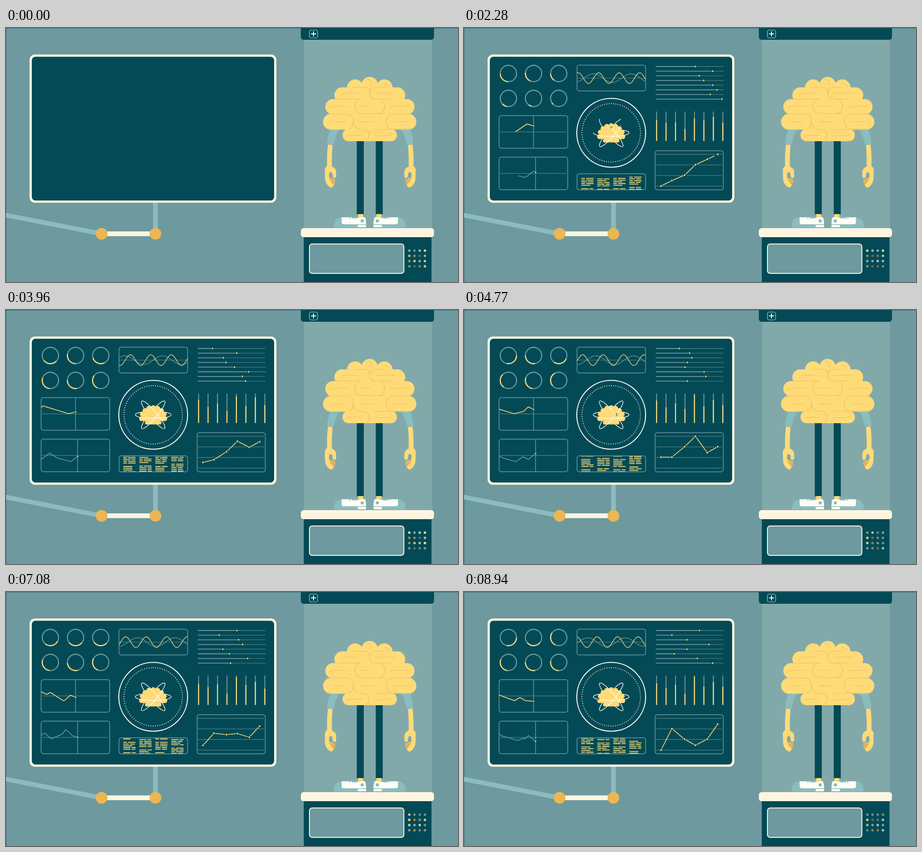
These frames come from a looping animation (998x561 px, 8970 ms). An HTML page with a canvas:

```html
<!DOCTYPE html>
<html lang="en">
<head>
<meta charset="utf-8">
<title>Brain scan</title>
<style>
html, body { margin: 0; width: 100%; height: 100%; overflow: hidden; background: #6d999f; }
canvas { display: block; }
</style>
</head>
<body>
<canvas id="stage" width="998" height="561"></canvas>
<script>
const W = 998, H = 561, LOOP = 8970;
const BG = '#6d999f', DARK = '#034a56', CREAM = '#fdf5e0', BLUE = '#8bbcbe',
  YELLOW = '#ffdb78', GOLD = '#ebb653', GREY = '#6d999f', WHITE = '#fffdf5';

const stage = document.getElementById('stage').getContext('2d');
const backdrop = document.createElement('canvas');
backdrop.width = W;
backdrop.height = H;
let c = backdrop.getContext('2d');

const clamp = v => Math.max(0, Math.min(1, v));
const lerp = (a, b, p) => a + (b - a) * p;
const inOut = p => p < .5 ? 4 * p ** 3 : 1 - 4 * (1 - p) ** 3;
const out = p => 1 - (1 - p) ** 3;
const ramp = (t, start, len) => clamp((t - start) / len);
const hash = n => { const s = Math.sin(n * 127.1 + 3.7) * 43758.5453; return s - Math.floor(s); };

// Eased value at time t between keyed values
function keyed(times, values, t) {
  if (t <= times[0]) return values[0];
  for (let i = 1; i < times.length; i++) {
    if (t < times[i]) {
      const p = (t - times[i - 1]) / (times[i] - times[i - 1]);
      return lerp(values[i - 1], values[i], p * p * (3 - 2 * p));
    }
  }
  return values[times.length - 1];
}

function rect(x, y, x2, y2, r, fill, stroke, width) {
  c.beginPath();
  c.roundRect(x, y, x2 - x, y2 - y, r);
  if (fill) { c.fillStyle = fill; c.fill(); }
  if (stroke) { c.strokeStyle = stroke; c.lineWidth = width; c.stroke(); }
}

function disc(x, y, r, fill) {
  c.beginPath();
  c.arc(x, y, r, 0, Math.PI * 2);
  c.fillStyle = fill;
  c.fill();
}

function line(points, color, width) {
  c.beginPath();
  points.forEach(([x, y]) => c.lineTo(x, y));
  c.strokeStyle = color;
  c.lineWidth = width;
  c.stroke();
}

function dotted(x, y, x2, gap = 3.4, width = 1.4) {
  if (x2 <= x) return;
  c.save();
  c.lineCap = 'round';
  c.setLineDash([0, gap]);
  line([[x, y], [x2, y]], '#e6eee4', width);
  c.restore();
}

function arc(x, y, r, from, to, color, width) {
  c.beginPath();
  c.arc(x, y, r, from, to);
  c.strokeStyle = color;
  c.lineWidth = width;
  c.stroke();
}

function shape(d, fill, stroke, width) {
  const p = new Path2D(d);
  if (fill) { c.fillStyle = fill; c.fill(p); }
  if (stroke) { c.strokeStyle = stroke; c.lineWidth = width; c.stroke(p); }
}

function mirrored(axis, draw) {
  draw();
  c.save();
  c.translate(axis * 2, 0);
  c.scale(-1, 1);
  draw();
  c.restore();
}

function brain() {
  disc(803, 126, 18, YELLOW);
  mirrored(803.2, () => {
    disc(771, 131.5, 18, YELLOW);
    disc(742.5, 148.5, 17.5, YELLOW);
  });
  rect(742, 131, 864, 166, 8, YELLOW);
  rect(705, 157, 902, 191, 17, YELLOW);
  rect(700, 190, 906, 224.5, 17, YELLOW);
  rect(743, 223, 863, 250, 13, YELLOW);
}

function grooves() {
  c.lineCap = 'round';
  shape(`M741 151 Q742 144 750 144 H776 M766 131 H792 Q802 131 803 142 Q803 157 816 157 H848
    M797 114 Q806 113 806 121 V126 M803 145 Q804 131 816 131 H837 M834 122 Q844 123 846 131
    M816 144 H859 M724 157 H784 M715 177 Q717 173 724 173 H754 M783 157 Q770 160 770 173
    Q771 187 786 189 H836 M784 173 H806 M823 157 Q836 161 836 174 Q834 188 822 189
    M849 177 Q850 173 857 173 H889 M708 190 H754 Q767 192 767 207 Q767 220 757 223
    M719 207 H750 M783 207 H812 M792 205 V208 M767 205 Q768 223 783 224 H793 Q802 227 802 238 Q801 246 796 247
    M839 207 Q841 192 853 190 H898 M839 207 Q841 220 850 223 H895 M856 207 H888
    M815 224 H850 M752 240 Q753 237 760 237 H786 M812 238 H842 Q850 237 853 233`, null, '#eabd60', 1.2);
  c.lineCap = 'butt';
}

function limb() {
  shape('M716 224 H736 Q727 238 723.5 258 L709 256 Q710 240 716 224Z', BLUE);
  shape('M711 257 L721 258.5 Q719 281 719.5 306 Q728 309 729 318 V328 Q728 332 724 331 Q721 330 721 324 Q721 318 716 318 Q713 319 713 327 Q714 334 720 332 L727 336 Q726 345 721 351 Q718 354 713 350 Q706 344 704.5 334 L704 313 Q705 307 709 305 Q708 280 711 257Z', YELLOW);
  shape('M713 332 Q719 335 727 333 Q728 340 724 347 Q718 342 713 332Z', '#dfb35c');
}

function leg() {
  rect(774.5, 249, 790, 411.5, 0, DARK);
  rect(777.5, 411, 788.5, 420, 0, YELLOW);
  shape('M724 441 V434 Q726 419 742 418 H795 V441Z', BLUE);
  shape('M741 418 H761 Q770 422 776 419 L791 417.5 Q795 421 795 433.5 H745 Q741 433 741 429Z', WHITE);
  rect(776.5, 435, 795, 440, 1, WHITE);
  disc(786.5, 426, 3.6, BLUE);
  c.lineCap = 'round';
  shape('M757 416 l3 5 M762.5 415.5 l3 5.5 M768 415.5 l3 5.5 M773 415 l2 5', null, BLUE, 1.5);
  c.lineCap = 'butt';
}

function drawBackdrop() {
  rect(0, 0, W, H, 0, BG);
  rect(0, 0, W, 1, 0, 'rgba(3,74,86,.5)');
  rect(0, 0, 1, H, 0, 'rgba(3,74,86,.5)');

  line([[-4, 412.5], [211, 454.5]], BLUE, 10);
  line([[330, 384], [330, 455]], BLUE, 10.5);
  line([[211, 454.5], [330, 454.5]], CREAM, 10.5);
  disc(211, 454.5, 13, GOLD);
  disc(330, 454.5, 13, GOLD);
  rect(52, 58.5, 597, 386, 12, CREAM);
  rect(57, 63.5, 592, 381, 8, DARK);

  rect(658, 20, 940.5, 445, 0, '#82a9aa');
  rect(651, -8, 945, 26, 6, DARK);
  rect(670, 4.5, 688, 22, 4, null, '#b9d0cc', 1.2);
  line([[673.5, 13], [684.5, 13]], WHITE, 2);
  line([[679, 7.5], [679, 18.5]], WHITE, 2);

  mirrored(804.3, limb);
  mirrored(803.2, leg);
  brain();
  grooves();

  rect(657.5, 460, 939.5, H, 0, DARK);
  rect(651, 442, 945, 462, 6, CREAM);
  rect(670, 477, 878.5, 542, 6, BG, CREAM, 2);
}

const KEYS = [3150, 4770, 6300, 7890, 8940];

// centre angle of the highlight on each ring, in degrees
const RINGS = [
  [135, 50, 50, 110, 50], [150, 130, 120, 60, 90], [150, 75, 80, 110, 165],
  [120, 175, 165, 130, 150], [115, 150, 130, 120, 130], [140, 190, 175, 140, 140]
];
const RING_START = [788, 920, 1030, 1060, 920, 788];

function rings(t) {
  const rad = Math.PI / 180;
  RINGS.forEach((mid, i) => {
    const x = 98 + (i % 3) * 55.6, y = i < 3 ? 100.5 : 155.5;
    const p = out(ramp(t, RING_START[i], 1100));
    if (p > 0) arc(x, y, 18, (180 - 360 * p) * rad, Math.PI, GREY, 2.4);
    const half = 50 * inOut(ramp(t, 1700 + i * 60, 900));
    const a = keyed(KEYS, mid, t);
    if (half > 0) arc(x, y, 18, (a - half) * rad, (a + half) * rad, YELLOW, 2.4);
  });
}

// Box that opens from its centre; returns its left and right edge, or null
function panel(x, y, x2, y2, t, start) {
  const tall = inOut(ramp(t, start - 200, 300));
  if (!tall) return null;
  const wide = Math.max(.01, inOut(ramp(t, start, 700)));
  const cx = (x + x2) / 2, cy = (y + y2) / 2;
  const w = (x2 - x) / 2 * wide, h = (y2 - y) / 2 * tall;
  rect(cx - w, cy - h, cx + w, cy + h, Math.min(5, w), null, GREY, 1.5);
  return [cx - w, cx + w];
}

function within(x, y, x2, y2, draw) {
  c.save();
  c.beginPath();
  c.rect(x, y, x2 - x, y2 - y);
  c.clip();
  draw();
  c.restore();
}

function wave(x, x2, peak, length, amp, color) {
  const pts = [];
  for (let i = x; i <= x2 + 1; i++) pts.push([i, 110.7 - amp * Math.cos((i - peak) / length * Math.PI * 2)]);
  line(pts, color, 1.3);
}

function waves(t) {
  const edge = panel(249.5, 82, 401, 139, t, 1134);
  if (!edge) return;
  within(edge[0], 82, edge[1], 139, () => {
    dotted(edge[0] + 2, 110.7, lerp(edge[0], edge[1], ramp(t, 900, 700)), 3, 1.2);
    wave(edge[0], edge[1], 340 + .0355 * (t - 1470), 83, 9.5, GREY);
    wave(edge[0], edge[1], 310 + .0402 * (t - 1470), 45.2, 11.8, YELLOW);
  });
}

function marker(x, y, size = 1) {
  disc(x, y, 3.2 * size, DARK);
  disc(x, y, 1.9 * size, YELLOW);
}

// [time at the pen, height]
const TRACE_A = [[1121, 229], [1856, 212], [3505, 229], [4123, 224], [4430, 214], [5212, 226], [5447, 222],
  [6280, 240], [6390, 239], [6743, 228], [7705, 240], [8058, 233], [8410, 240], [8970, 241.5]];
const TRACE_B = [[1179, 326.5], [1643, 330], [2165, 316], [2686, 327], [3524, 335], [3958, 324], [4315, 330],
  [4967, 311], [5401, 324], [6095, 314], [6325, 304], [6760, 317.5], [7810, 328], [8158, 323], [8245, 325],
  [8476, 317], [8970, 330.5]];

function trace(t, top, start, pen, speed, points, color, baseStart) {
  const edge = panel(77.5, top, 229, top + 72, t, start);
  if (!edge) return;
  dotted(edge[0] + 4, top + 36, lerp(edge[0] + 4, edge[1] - 2, ramp(t, baseStart, 700)));
  const drop = 72 * inOut(ramp(t, 1550, 600));
  if (drop) line([[pen, top], [pen, top + drop]], GREY, 1.5);
  if (t < points[0][0]) return;
  const path = [];
  points.forEach(([u, y], i) => {
    if (u <= t) {
      path.push([pen - speed * (t - u), y]);
    } else if (points[i - 1][0] <= t) {
      const [u0, y0] = points[i - 1];
      path.push([pen, lerp(y0, y, (t - u0) / (u - u0))]);
    }
  });
  within(edge[0], top, edge[1], top + 72, () => {
    line(path, color, 1.6);
    const [x, y] = path[path.length - 1];
    marker(x, y, .9);
  });
}

const SLIDERS = [
  [437, 475, 500, 520], [521, 498, 482, 459], [456, 503, 534, 492], [478, 493, 505, 541],
  [521, 488, 466, 492], [542, 530, 521, 464], [509, 534, 551, 515], [565, 493, 445, 549]
];

function sliders(t) {
  SLIDERS.forEach((stops, i) => {
    const y = 85 + i * 10.3, p = out(ramp(t, 500 + i * 25, 900));
    if (!p) return;
    const x = t < 1500 ? lerp(423.5, 573, p) : keyed([1500, ...KEYS.slice(0, 4)], [573, ...stops], t);
    line([[423.5, y], [x, y]], GREY, 1.8);
    if (t > 1500) dotted(x + 4, y, 573, 3, 1.3);
    marker(x, y, .95);
  });
}

const BARS = [
  [208, 197, 200, 207, 198, 202], [206, 213, 215, 215, 205, 212], [210, 207, 206, 202, 206, 205],
  [218, 228, 218, 227, 222, 225], [205, 194, 187, 189, 186, 187], [198, 211, 213, 201, 210, 209],
  [205, 187, 199, 199, 198, 199], [208, 210, 210, 207, 220, 209]
];

function bars(t) {
  BARS.forEach((tops, i) => {
    const x = 425.2 + i * 20.9, p = out(ramp(t, 600 + i * 30, 600));
    if (!p) return;
    const y = keyed([900, 1470, ...KEYS], [249, ...tops], t);
    line([[x, 249 - 64.5 * p], [x, 249]], GREY, 2);
    line([[x, y], [x, 249.5]], YELLOW, 2.3);
  });
}

const PLOT_X = [435, 459, 487, 511, 537, 560];
const PLOT_Y = [[349, 325, 349], [337, 325, 302], [325, 302, 325], [302, 279, 338.5], [290, 315, 325], [279, 302, 292]];

function plot(t) {
  const edge = panel(422, 271, 572.5, 357.5, t, 1100);
  if (!edge) return;
  const p = ramp(t, 1380, 700);
  for (let i = 0; i < 4; i++) dotted(edge[0] + 3, 279 + i * 23.4, lerp(edge[0] + 3, edge[1] - 2, p));
  const pts = PLOT_X.map((x, i) => [x, keyed([3600, 4300, 6700, 7400], [PLOT_Y[i][0], PLOT_Y[i][1], PLOT_Y[i][1], PLOT_Y[i][2]], t)]);
  const reach = lerp(435, 560, inOut(ramp(t, 1600, 900)));
  within(422, 271, reach, 357, () => line(pts, YELLOW, 1.6));
  pts.forEach(([x, y], i) => {
    const size = ramp(t, 1350 + (i * 2 % 5) * 40, 350);
    if (size) marker(x, y, size);
  });
}

const ORBITS = [
  { tilt: 0, front: 1, lead: 0, tail: 75 },
  { tilt: 50, front: -1, lead: 10, tail: 40 },
  { tilt: -50, front: 1, lead: 165, tail: 35 }
];

function orbit(t, o, front) {
  if (t < 1150) return;
  const tilt = o.tilt * Math.PI / 180;
  const head = 90 - .119 * (t - 6300) + 70 * (1 - inOut(ramp(t, 1470, 1680))) + o.lead;
  const grown = t < 1470 ? o.tail * ramp(t, 1150, 320) : lerp(o.tail, 356, inOut(ramp(t, 1470, 1300)));
  const at = deg => {
    const a = deg * Math.PI / 180, x = 39.5 * Math.cos(a), y = 8 * Math.sin(a);
    return [325 + x * Math.cos(tilt) - y * Math.sin(tilt), 231.5 + x * Math.sin(tilt) + y * Math.cos(tilt)];
  };
  const visible = deg => (Math.sin(deg * Math.PI / 180) * o.front >= 0) === front;
  c.beginPath();
  for (let d = 0; d < grown; d += 4) {
    const end = Math.min(d + 4.2, grown);
    if (!visible(head + d + 2)) continue;
    c.moveTo(...at(head + d));
    c.lineTo(...at(head + end));
  }
  c.strokeStyle = WHITE;
  c.lineWidth = 1.4;
  c.stroke();
  if (visible(head)) {
    const [x, y] = at(head);
    disc(x, y, 2, DARK);
    disc(x, y, 1.2, YELLOW);
  }
}

function core(t) {
  const p = inOut(ramp(t, 250, 800)), q = inOut(ramp(t, 450, 800));
  const top = -Math.PI / 2;
  if (p) arc(325, 231.5, 76, top, top + Math.PI * 2 * p, WHITE, 2.1);
  if (q) {
    c.save();
    c.lineCap = 'round';
    c.setLineDash([0, 5.066]);
    arc(325, 231.5, 64.5, top, top + Math.PI * 2 * q, WHITE, 2);
    c.restore();
  }
  ORBITS.forEach(o => orbit(t, o, false));
  const size = .301 * out(ramp(t, 650, 500));
  if (size) {
    c.save();
    c.translate(325, 231.5);
    c.scale(size, size);
    c.translate(-803.1, -179);
    brain();
    c.restore();
  }
  ORBITS.forEach(o => orbit(t, o, true));
}

function readout(t) {
  if (!panel(249.5, 322, 401, 357.5, t, 650)) return;
  within(250, 323, 400.5, 357, () => {
    for (let col = 0; col < 4; col++) {
      const x = 259 + col * 35.3;
      const first = [347.5, 350, 347.5, 346][col] - (.019 + .0015 * (col % 2)) * (t - 1470);
      for (let row = 0; row < 64; row++) {
        const y = first + row * 3.8;
        if (y < 320 || y > 359 || row % 6 === 5) continue;
        const h = hash(row * 5 + col * 71);
        const a = 8 + Math.floor(h * 4) * 4;
        line([[x, y], [x + a, y]], YELLOW, 1.8);
        if (h < .72) line([[x + a + 2.5, y], [x + (h < .35 ? 27 : 22 + h * 8), y]], YELLOW, 1.8);
      }
    }
  });
}

const LAMPS = ['YLLY', 'YOOL', 'YLLY', 'LOOL'];
const LAMP_COLOR = { Y: YELLOW, L: '#aed4d3', O: '#cf8436' };

function lamps(t) {
  LAMPS.forEach((names, row) => [...names].forEach((name, col) => {
    const n = row * 4 + col;
    c.globalAlpha = .75 + .25 * Math.sin(t / (210 + 160 * hash(n)) + hash(n + 40) * 6.28);
    disc(890.5 + col * 11.5, 491.7 + row * 11.5, 2.7, LAMP_COLOR[name]);
  }));
  c.globalAlpha = 1;
}

function draw(t) {
  c.drawImage(backdrop, 0, 0);
  rings(t);
  waves(t);
  trace(t, 193.5, 987, 153.5, .034, TRACE_A, YELLOW, 1300);
  trace(t, 285.3, 1099, 158, .0345, TRACE_B, GREY, 1500);
  sliders(t);
  bars(t);
  plot(t);
  core(t);
  readout(t);
  lamps(t);
}

drawBackdrop();
c = stage;
const begin = performance.now();
function tick() {
  draw((performance.now() - begin) % LOOP);
  requestAnimationFrame(tick);
}
tick();
</script>
</body>
</html>
```
